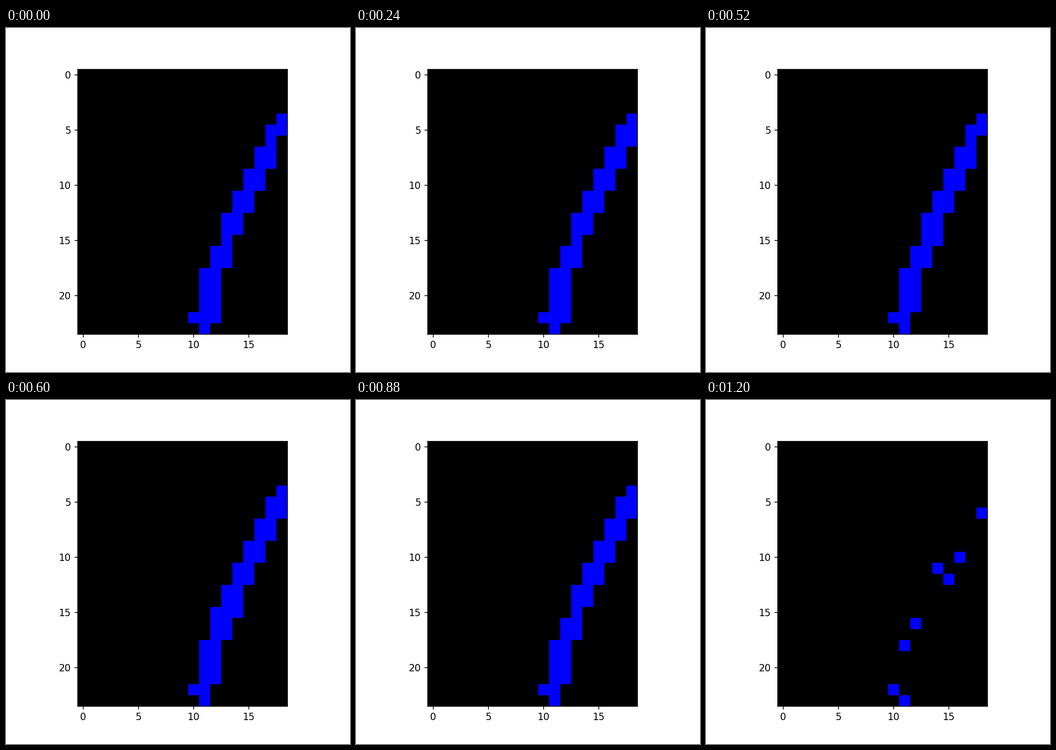
Animation, 748 px wide and 748 px high, one loop 1.24 s. Source, as a matplotlib script:

```python
import numpy as np
import matplotlib.pyplot as plt
from matplotlib.animation import FuncAnimation

SIZE, DPI = 748, 150
ROWS, COLS = 24, 19
STEPS, INTERVAL = 31, 40
TOP = 4        # first row of the band
JITTER = 0.1   # noise of the band's edges, in cells

# Key points (row, column) of the band's two edges
LEFT = [(4, 17.75), (12.5, 13.5), (17.5, 11.5), (21.5, 10.5), (22, 10.2), (23, 11)]
RIGHT = [(4, 18.2), (8.5, 16.5), (15, 13.47), (18, 12.25), (22, 11.48), (23, 11.2)]

# Cells that survive to the end of the loop
REMNANT = [(6, 18), (10, 16), (11, 14), (12, 15), (16, 12), (18, 11), (22, 10), (23, 11)]

row, col = np.indices((ROWS, COLS))


def edge(points, rng):
    """Column of an edge in each row, with a little noise."""
    rows, cols = zip(*points)
    line = np.interp(np.arange(ROWS), rows, cols)
    return np.round(line + rng.normal(0, JITTER, ROWS))[:, None]


def lit_cells(step):
    rng = np.random.default_rng([7, step])
    left, right = edge(LEFT, rng), edge(RIGHT, rng)
    grid = (row >= TOP) & (col >= left) & (col <= right)
    left_over = STEPS - 1 - step
    if left_over < 2:
        # The band thins out until only the remnant is left
        grid &= rng.random(grid.shape) < 0.6 * left_over
        grid[tuple(zip(*REMNANT))] = True
    return grid


def to_rgb(grid):
    rgb = np.zeros((ROWS, COLS, 3), np.uint8)
    rgb[grid, 2] = 255
    return rgb


def update(step):
    image.set_data(to_rgb(lit_cells(step)))
    return [image]


plt.rcParams["font.family"] = "DejaVu Sans"
fig, ax = plt.subplots(figsize=(SIZE / DPI, SIZE / DPI), dpi=DPI)
fig.subplots_adjust(left=0.1255, right=0.9005)
image = ax.imshow(to_rgb(lit_cells(0)), interpolation="nearest")
ax.set_xticks(range(0, COLS, 5))
ax.set_yticks(range(0, ROWS, 5))

anim = FuncAnimation(fig, update, frames=STEPS, interval=INTERVAL,
                     repeat=True, repeat_delay=0)
plt.show()
```
